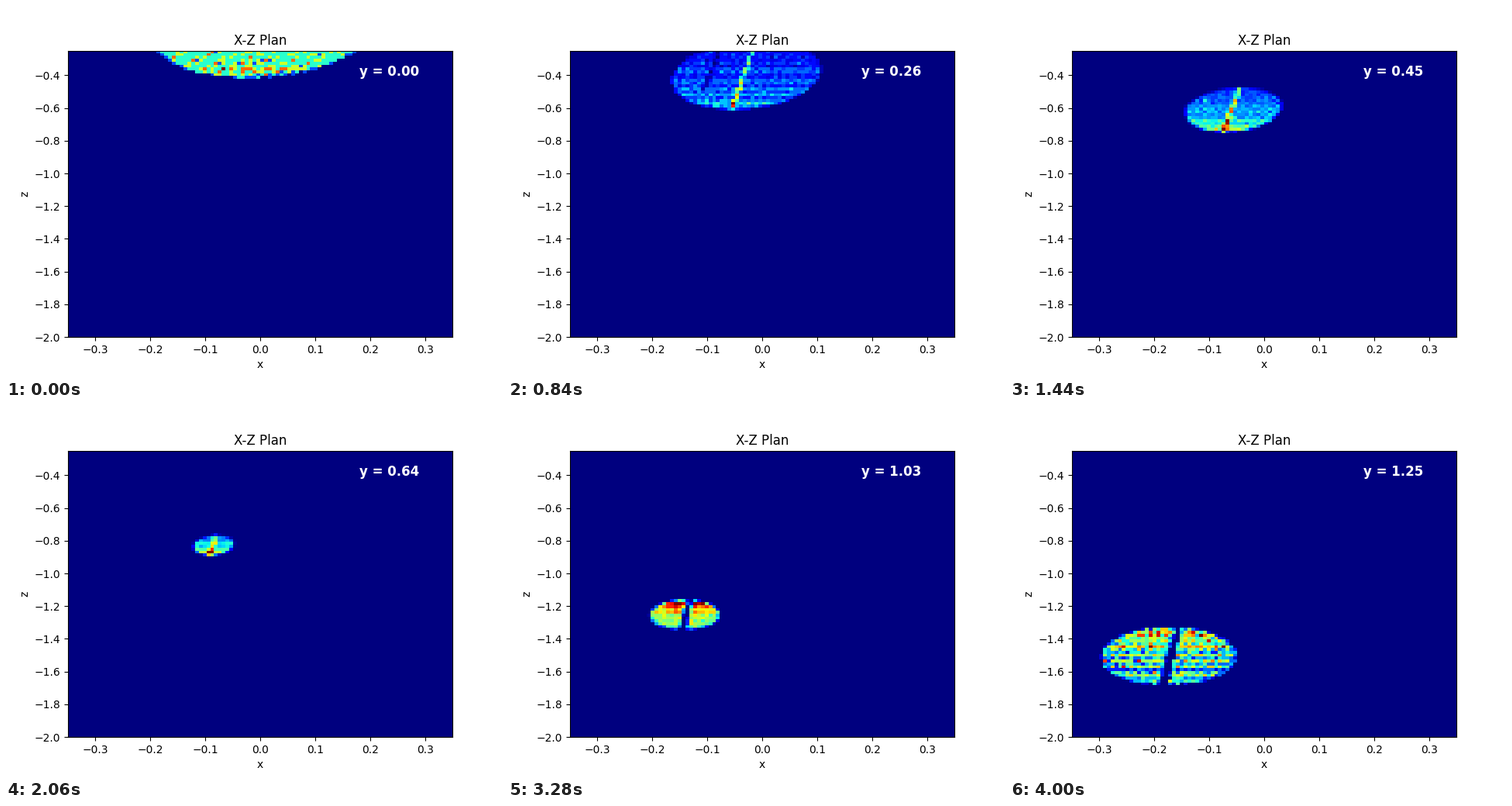
Recreate the animation shown at these times as a matplotlib script. Size 640 by 480 pixels, loop 4.02 s.

```python
import numpy as np
import matplotlib.pyplot as plt
from matplotlib.animation import FuncAnimation

FRAMES = 201
FOCUS = 128
BINS = 100
X_LIM, Z_LIM = (-0.35, 0.35), (-2.0, -0.25)
CELL = (X_LIM[1] - X_LIM[0]) * (Z_LIM[1] - Z_LIM[0]) / BINS**2
SPREAD_X, SPREAD_Z = 0.00164, 0.00243

# Rays leave a unit disc on a regular grid (p across, q along).
GRID = 62
PITCH = 2 / GRID
rng = np.random.default_rng(7)
axis = (np.arange(GRID) + 0.5) * PITCH - 1
P, Q = np.meshgrid(axis, axis)
JP = rng.normal(0, 0.5 * PITCH, P.shape)
# Rows shift mostly as a whole, which leaves horizontal streaks.
JQ = rng.normal(0, 0.25 * PITCH, P.shape) + rng.normal(0, 0.45 * PITCH, (GRID, 1))
inside = P**2 + Q**2 < 0.985
P, Q, JP, JQ = (g[inside] for g in (P, Q, JP, JQ))


def trace(f):
    """Positions and weights of the rays in the plane of step f."""
    past = f > FOCUS
    jitter = 0.25 + 0.006 * f
    q = np.clip(Q + jitter * JQ, -0.995, 0.995)
    p = P + jitter * JP
    half = np.sqrt(1 - q**2)
    p = np.clip(p, -half, half)

    # Coma crowds the rays towards one rim.
    coma = 0.2 * np.exp(-((f - 100) / 130) ** 2)
    v = q - coma * (1 - q**2)
    p = p * np.sqrt(1 - v**2) / half

    # The two halves of the beam are pushed apart along a seam.
    seam = p - 0.03 + (0.09 * v if past else 0)
    push = (0.001 + 3.6e-5 * f) * np.sign(seam) * (1 - np.abs(p)) ** 2

    tilt = -0.03 if past else -0.17
    u = tilt * v + np.sqrt(1 - tilt**2) * p
    x = 0.010 - 0.00092 * f + SPREAD_X * (f - 125.3) * u + push
    z = -0.107 - 0.00701 * f - SPREAD_Z * (f - FOCUS) * v

    band = 0 if past else 0.035 * min(f / 30, 1)
    weight = np.where(np.abs(seam) < band, 2, 1)
    if f < 60:
        weight[(np.abs(p - 0.505) < 0.03) & (q > -0.3)] = 0
    return x, z, weight


def density(f):
    x, z, weight = trace(f)
    counts, _, _ = np.histogram2d(z, x, BINS, [Z_LIM, X_LIM], weights=weight)
    a = max(SPREAD_X * abs(f - 125.3), 0.004)
    b = max(SPREAD_Z * abs(f - FOCUS), 0.006)
    mean = P.size * CELL / (np.pi * a * b)
    level = np.interp(f, [0, 25, 42, 72, 103, 128, 164, 200],
                      [0.31, 0.20, 0.19, 0.30, 0.42, 0.50, 0.55, 0.29])
    return counts, max(1, min(round(mean / level), counts.max()))


fig, ax = plt.subplots(figsize=(6.4, 4.8), dpi=100)
image = ax.imshow(np.zeros((BINS, BINS)), cmap="jet", origin="lower",
                  extent=[*X_LIM, *Z_LIM], aspect="auto",
                  interpolation="nearest", vmin=0, vmax=1)
label = ax.text(0.18, -0.4025, "", color="white", fontsize=12, fontweight="bold")
ax.set_title("X-Z Plan", pad=5.6)
ax.set_xlabel("x")
ax.set_ylabel("z")


def update(f):
    counts, top = density(f)
    image.set_data(counts)
    image.set_clim(0, top)
    label.set_text(f"y = {f / 160 + 1e-9:.2f}")
    return image, label


anim = FuncAnimation(fig, update, frames=FRAMES, interval=20,
                     repeat=True, repeat_delay=0)
plt.show()
```
